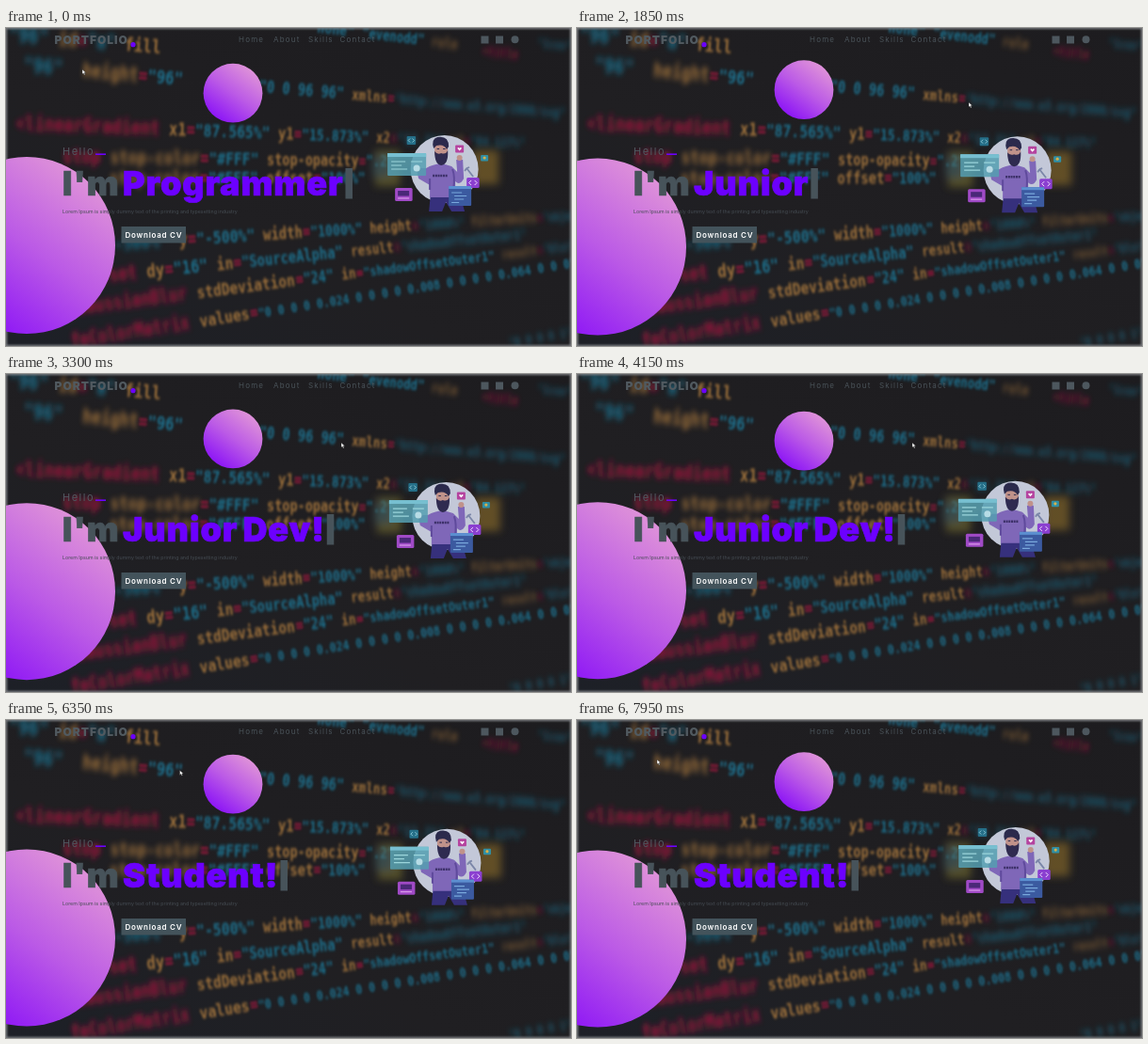
Write an HTML page that moves like this. It is 600x338 px and loops after 8 s.

```html
<!DOCTYPE html>
<html lang="en">
<head>
<meta charset="utf-8">
<title>Portfolio</title>
<style>
  html, body { margin: 0; width: 100%; height: 100%; overflow: hidden; background: #1f1e21; }
  svg { position: absolute; inset: 0; width: 100%; height: 100%; display: block; }
  text { font-family: Inter, "Open Sans", sans-serif; white-space: pre; }
  #code text { font-family: "DejaVu Sans Mono", "Noto Sans Mono", monospace; font-weight: 700; }
  #nav text { font-size: 8px; letter-spacing: 1.2px; fill: #4a5359; }
  #title { font-size: 36px; font-weight: 900; letter-spacing: .9px; word-spacing: -3px; stroke-width: .7px; }
</style>
</head>
<body>
<svg viewBox="0 0 600 338">
  <defs>
    <linearGradient id="dark" x1="1" y1="0" x2="0" y2="1">
      <stop offset="0" stop-color="#1d1c1f"/>
      <stop offset=".6" stop-color="#201f22"/>
      <stop offset="1" stop-color="#1d2027"/>
    </linearGradient>
    <filter id="far" x="-30%" y="-60%" width="160%" height="220%"><feGaussianBlur stdDeviation="2.5"/></filter>
    <filter id="mid" x="-30%" y="-60%" width="160%" height="220%"><feGaussianBlur stdDeviation="1.25"/></filter>
    <filter id="edge" x="-5%" y="-5%" width="110%" height="110%"><feGaussianBlur stdDeviation="1"/></filter>
  </defs>
  <rect width="600" height="338" fill="url(#dark)"/>
  <g id="code"></g>
  <rect width="600" height="338" fill="none" stroke="#8b8d92" stroke-width="2" filter="url(#edge)"/>
</svg>

<svg viewBox="0 0 600 338">
  <defs>
    <linearGradient id="pink" x1=".82" y1=".08" x2=".2" y2=".92">
      <stop offset="0" stop-color="#e094d8"/>
      <stop offset=".5" stop-color="#bb5ae6"/>
      <stop offset="1" stop-color="#8c14f6"/>
    </linearGradient>
    <filter id="glow" x="-60%" y="-60%" width="220%" height="220%"><feGaussianBlur stdDeviation="4"/></filter>
  </defs>

  <circle id="big" cx="22" r="94" fill="url(#pink)"/>
  <circle id="small" cx="241" r="31.4" fill="url(#pink)"/>

  <text x="51.5" y="17" font-size="12" font-weight="900" letter-spacing="1" fill="#515a60">PORTFOLIO</text>
  <circle cx="135" cy="17.7" r="2.6" fill="#6c00ff"/>
  <g id="nav">
    <text x="247" y="15.3">Home</text>
    <text x="284" y="15.3">About</text>
    <text x="321" y="15.3">Skills</text>
    <text x="354.5" y="15.3">Contact</text>
  </g>
  <g fill="#4d575e">
    <rect x="504.5" y="8.5" width="8" height="8"/>
    <rect x="520" y="8.5" width="8" height="8"/>
    <circle cx="540.5" cy="12.3" r="4"/>
  </g>

  <text x="60" y="134.5" font-size="11" letter-spacing="1.5" fill="#505a61">Hello</text>
  <rect x="95" y="133.4" width="11" height="1.6" fill="#6c00ff"/>
  <g id="title">
    <text x="60" y="178" fill="#47535a" stroke="#47535a">I'm</text>
    <text id="word" x="124" y="178" fill="#6c00ff" stroke="#6c00ff"></text>
    <rect id="bar" y="149" width="7.5" height="32.5" fill="#47535a"/>
  </g>
  <text x="60" y="197.3" font-size="5.3" fill="#454c53">Lorem Ipsum is simply dummy text of the printing and typesetting industry</text>
  <rect x="122.5" y="211" width="68.5" height="17.5" fill="#43535b"/>
  <text x="126.5" y="222.8" font-size="8" font-weight="600" letter-spacing=".75" fill="#fff">Download CV</text>

  <g id="art">
    <g filter="url(#glow)" opacity=".6">
      <rect x="392" y="130" width="26" height="38" fill="#77702f"/>
      <rect x="390" y="136" width="18" height="22" fill="#4d6a68"/>
      <rect x="496" y="130" width="27" height="36" fill="#8f6f2c"/>
    </g>
    <circle cx="465.500" cy="150" r="36" fill="#c3c8d8"/>
    <path d="M451 174H481L487 195H473L467 185L463 195H449Z" fill="#36307c"/>
    <path d="M446 149Q459 141 473 147L479 153L478 140H485L486 160Q482 168 477 163V180H450V167L438 160L436 151L441 149Z" fill="#7f67b8"/>
    <path d="M450 160V172M474 150Q477 158 475 172" stroke="#5f4a9c" stroke-width="2" fill="none"/>
    <path d="M453 157H469" stroke="#3c3068" stroke-width="2.5" stroke-dasharray="2 .7"/>
    <g fill="#c0928a">
      <rect x="455" y="123" width="14" height="15" rx="5"/>
      <circle cx="481.500" cy="138" r="3"/>
      <circle cx="437" cy="150" r="3"/>
    </g>
    <path d="M454 128Q451 118 458 116Q470 114 470 126L468 129Q465 123 457 125Z" fill="#2b2a4c"/>
    <path d="M455 131Q458 135 462 133Q467 135 469 130Q470 145 462 146Q455 145 455 131Z" fill="#2f2b50"/>
    <path d="M457.500 128.500H460M464 128.500H466.500" stroke="#2b2a4c"/>
    <path d="M489 149L496 158M489 149l-2 3M489 149l3-1" stroke="#7b86a8" stroke-width="1.8"/>

    <rect x="405" y="133" width="41" height="24" rx="1" fill="#559fb2" opacity=".85"/>
    <rect x="405" y="133" width="41" height="4" fill="#77bfd0"/>
    <path d="M409 142H424M409 146H420M409 150H426M430 142H442" stroke="#9bd5db" stroke-width="1.2"/>
    <circle cx="436" cy="149" r="3.500" fill="#b7dce6"/>

    <rect x="425.500" y="115" width="9.500" height="9" rx="1" fill="#256f88"/>
    <path d="M429 117.500l-2 2l2 2M431.500 117.500l2 2l-2 2" stroke="#a3dbe6" fill="none" stroke-width=".8"/>
    <rect x="504" y="135" width="8" height="6.500" rx="1" fill="#2f8fa6"/>
    <circle cx="508" cy="138" r="1.600" fill="#d8b14a"/>
    <rect x="477" y="124.500" width="9" height="8" rx="1" fill="#b5439f"/>
    <path d="M481.500 130.500l-2.300-2.500q1-2 2.300 0q1.300-2 2.300 0z" fill="#fff"/>
    <rect x="489" y="159" width="13.500" height="11" rx="1.500" fill="#8b3fd0"/>
    <path d="M494 162l-2.500 2.500l2.500 2.500M497.500 162l2.500 2.500l-2.500 2.500" stroke="#f0dcff" fill="none"/>
    <rect x="413" y="170" width="18.500" height="14" rx="1.500" fill="#a04ac6"/>
    <rect x="416" y="173" width="12" height="5.500" fill="#4a2878"/>
    <path d="M416 181H428" stroke="#e2a9ef"/>
    <rect x="470" y="168" width="24" height="21" rx="1" fill="#3b5aa0"/>
    <rect x="470" y="168" width="24" height="3" fill="#5c8fd0"/>
    <path d="M473 175H484M476 178.500H489M476 182H486M473 185.500H481" stroke="#79a8dc" stroke-width="1.2"/>
  </g>

  <path id="mouse" d="M0 0V5L1.200 4L2.100 5.900L3 5.400L2.200 3.600H3.800Z" fill="#fff" stroke="#222" stroke-width=".4"/>
</svg>

<script>
const $ = id => document.getElementById(id);
const LOOP = 8000, STEP = 98;

// Blurred code: [start x, baseline at x = 0, slope, tag, attributes]
const lines = [
  [2, 14, .08, '', '"96" id="a" fill'],
  [322, -35, .12, '', '"none" "evenodd" rule'],
  [505, -32, .12, '<title', ''],
  [564, -48, .12, '', '"icon"'],
  [18, 45, .085, '', '"96"  height="96"         "0 0 96 96" xmlns="http://www.w3.org/2000/svg"'],
  [10, 108, .035, '<linearGradient', ' x1="87.565%" y1="15.873%" x2="12.1%" y2="84.127%"'],
  [60, 143, .01, 'stop', ' stop-color="#FFF" stop-opacity=".2" offset="0%"'],
  [110, 167, -.005, '', 'stop-color="#FFF" offset="100%"'],
  [85, 244, -.067, '', 'x="-500%"'],
  [184, 244, -.067, '', 'y="-500%" width="1000%" height="1000%" filterUnits="object"'],
  [60, 281, -.104, 'feOffset', ' dy="16" in="SourceAlpha" result="shadowOffsetOuter1"'],
  [56, 314, -.13, 'feGaussianBlur', ' stdDeviation="24" in="shadowOffsetOuter1" result="blur"'],
  [70, 351, -.16, 'feColorMatrix', ' values="0 0 0 0 0.024 0 0 0 0 0.008 0 0 0 0 0.064 0 0 0"'],
  [535, 430, -.17, '', '"0 0 0 0 1"']
];
const RED = '#a8173f', TAN = '#a3743c', TEAL = '#1d7391';
const advance = x => Math.max(5, 10.8 - x * .0082);

function drawCode() {
  let out = '';
  for (const [start, base, slope, tag, attrs] of lines) {
    let x = start;
    const put = (s, color) => {
      const w = advance(x + s.length * 4);
      const angle = Math.atan(slope) * 180 / Math.PI;
      const blur = x < 120 || x > 405 ? 'far' : 'mid';
      const fade = x > 405 ? .75 : .95;
      if (s.trim()) {
        out += `<text transform="translate(${x} ${base + slope * x}) rotate(${angle}) scale(1 1.25)" ` +
          `font-size="${w / .602}" fill="${color}" opacity="${fade}" filter="url(#${blur})">${s.replace(/</g, '&lt;')}</text>`;
      }
      x += w * s.length;
    };
    if (tag) put(tag, RED);
    for (const s of attrs.match(/"[^"]*"|=|\s+|[^\s="]+/g) || [])
      put(s, s[0] === '"' ? TEAL : s === '=' ? RED : TAN);
  }
  $('code').innerHTML = out;
}

// Each word is erased from its time on, then the next one is typed.
const words = ['Programmer', 'Junior Dev!', 'Student!'];
const erase = [200, 4200];

function typed(t) {
  let shown = words[0];
  erase.forEach((at, i) => {
    if (t < at) return;
    const n = Math.floor((t - at) / STEP), len = words[i].length;
    shown = n < len ? words[i].slice(0, len - n) : words[i + 1].slice(0, n - len);
  });
  return shown;
}

// Pointer stops: [start, end, x, y]
const stops = [[0, 0, 81, 44], [500, 1500, 416, 79], [2200, 2800, 356, 73], [5850, 6700, 85, 42]];

function pointer(t) {
  let [, , x, y] = stops[0];
  for (const [a, b, tx, ty] of stops.slice(1)) {
    const p = Math.min(1, Math.max(0, (t - a) / (b - a)));
    const e = p * p * (3 - 2 * p);
    x += (tx - x) * e;
    y += (ty - y) * e;
  }
  return [x, y];
}

const wave = (t, period, peak) => Math.cos((t - peak) / period * 2 * Math.PI);

function draw(t) {
  const bob = wave(t, 6000, 1700);
  $('small').setAttribute('cy', 68.6 - 3 * bob);
  $('big').setAttribute('cy', 231.3 + 1.3 * bob);

  const sway = (1 + wave(t, 4000, 2520)) / 2;
  $('art').setAttribute('transform', `translate(${3.4 * sway - .4} ${2 * sway - .3})`);

  const s = typed(t), word = $('word');
  if (word.textContent !== s) word.textContent = s;
  $('bar').setAttribute('x', 126 + (s ? word.getComputedTextLength() : 0));

  $('mouse').setAttribute('transform', `translate(${pointer(t)})`);
}

function tick() {
  draw(performance.now() % LOOP);
  requestAnimationFrame(tick);
}

drawCode();
tick();
</script>
</body>
</html>
```
